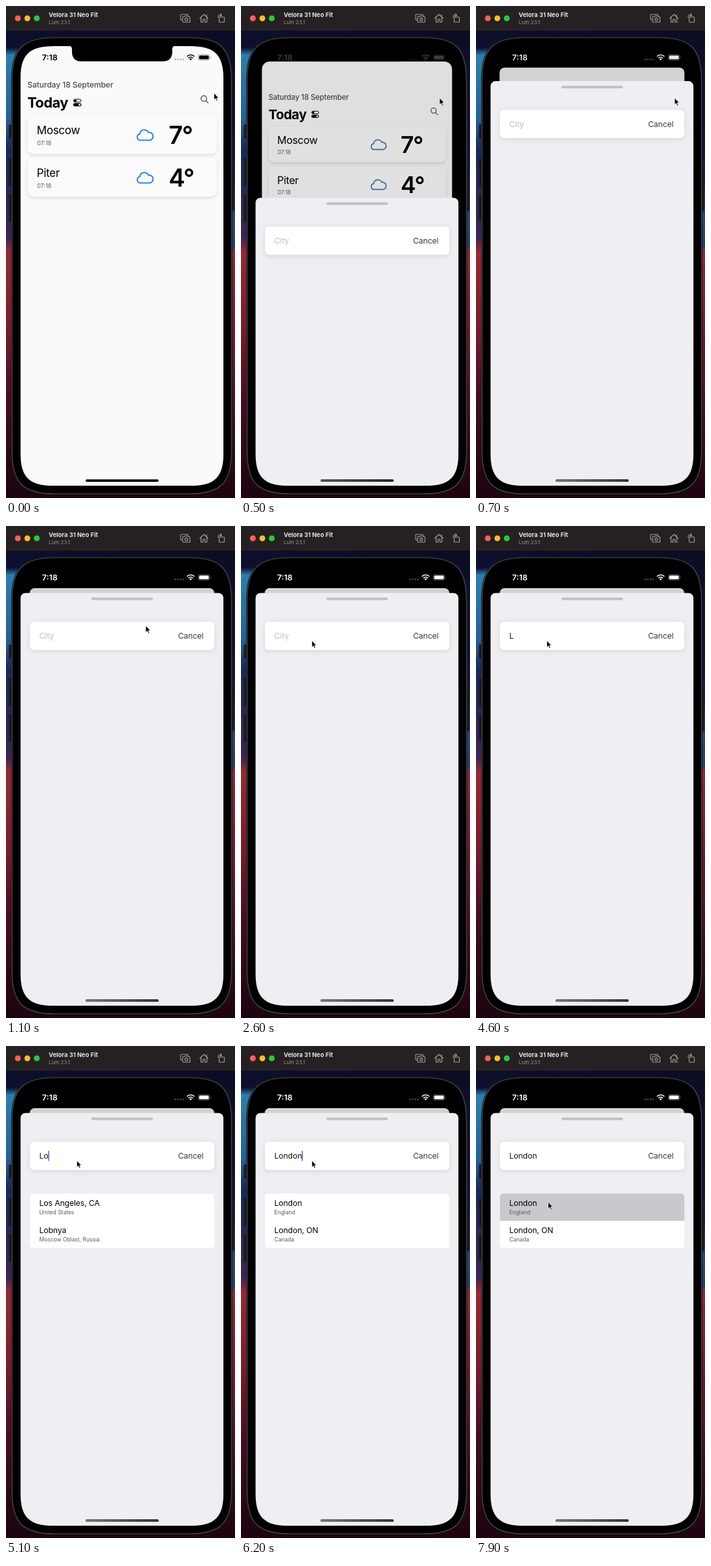
Animation of 354x760 px, one loop 8000 ms. Source, as an HTML page:

```html
<!DOCTYPE html>
<html lang="en">
<head>
<meta charset="utf-8">
<title>City search</title>
<style>
  html, body { margin: 0; width: 100%; height: 100%; overflow: hidden; background: #000; }
  svg { display: block; width: 100vw; height: 100vh; font-family: Inter, "Open Sans", sans-serif; }
  .line { fill: none; stroke-linecap: round; stroke-linejoin: round; }
  .card { fill: #fbfbfb; filter: drop-shadow(0 2.5px 2.5px rgba(0, 0, 0, .13)); }
  .field { fill: #fff; filter: drop-shadow(0 2px 4px rgba(0, 0, 0, .1)); }
  .body { font-size: 12.2px; letter-spacing: -.1px; }
  .small { font-size: 8.5px; fill: #5c5c5e; }
  .city { font-size: 17.2px; letter-spacing: -.35px; }
  .temp { font-size: 38px; font-weight: 600; letter-spacing: -1.4px; }
</style>
</head>
<body>
<svg viewBox="0 0 354 760" preserveAspectRatio="none">
  <defs>
    <linearGradient id="wallL" x2="0" y2="1">
      <stop offset="0" stop-color="#0a0b20"/>
      <stop offset=".085" stop-color="#0d1030"/>
      <stop offset=".1" stop-color="#2b7fae"/>
      <stop offset=".23" stop-color="#22629c"/>
      <stop offset=".29" stop-color="#182a5c"/>
      <stop offset=".47" stop-color="#3a2556"/>
      <stop offset=".5" stop-color="#9c2830"/>
      <stop offset=".66" stop-color="#7c1a2a"/>
      <stop offset=".8" stop-color="#480c20"/>
      <stop offset="1" stop-color="#1c0410"/>
    </linearGradient>
    <linearGradient id="wallR" x2="0" y2="1">
      <stop offset="0" stop-color="#0a0b20"/>
      <stop offset=".3" stop-color="#12153a"/>
      <stop offset=".43" stop-color="#23487e"/>
      <stop offset=".49" stop-color="#2a3a70"/>
      <stop offset=".5" stop-color="#94262f"/>
      <stop offset=".72" stop-color="#661424"/>
      <stop offset="1" stop-color="#1c0410"/>
    </linearGradient>
    <linearGradient id="bar"><stop stop-color="#777"/><stop offset="1" stop-color="#333"/></linearGradient>
    <clipPath id="screen"><path id="screenShape"/></clipPath>
    <clipPath id="listBox"><rect x="37" y="228" width="285" height="84" rx="5"/></clipPath>
  </defs>

  <rect width="180" height="760" fill="url(#wallL)"/>
  <rect x="180" width="174" height="760" fill="url(#wallR)"/>

  <!-- window bar -->
  <rect width="354" height="38" fill="#252122"/>
  <circle cx="18.3" cy="19" r="4.5" fill="#fe5f57"/>
  <circle cx="33" cy="19" r="4.5" fill="#febc2e"/>
  <circle cx="47.6" cy="19" r="4.5" fill="#28c840"/>
  <text x="66" y="17.3" font-size="9.4" font-weight="700" fill="#e6e4e5">Velora 31 Neo Fit</text>
  <text x="66" y="28" font-size="8" fill="#979495">Lum 23.1</text>
  <g class="line" stroke="#a5a2a3" stroke-width="1.1">
    <path d="M272.5 21.5H271a1 1 0 0 1-1-1V14a1 1 0 0 1 1-1h9.5a1 1 0 0 1 1 1v.8"/>
    <path d="M274 16.5h2l1-1.3h3.5l1 1.3h2a1 1 0 0 1 1 1V24a1 1 0 0 1-1 1H274a1 1 0 0 1-1-1v-6.500a1 1 0 0 1 1-1z"/>
    <circle cx="278.8" cy="20.7" r="2.1"/>
    <path d="M299.5 19l6.5-6 6.5 6M301.5 17.500V25h3v-4.500h3V25h3v-7.500M310 16v-2.500"/>
    <path d="M330.5 17h6a1 1 0 0 1 1 1v6a1 1 0 0 1-1 1h-6a1 1 0 0 1-1-1v-6a1 1 0 0 1 1-1zM328 17.500V16a2 2 0 0 1 2-2h3M331.500 12l2 2-2 2"/>
  </g>

  <!-- device -->
  <g fill="#1b1b20">
    <rect x="4.5" y="183" width="4" height="22" rx="1"/>
    <rect x="4.5" y="235" width="4" height="43" rx="1"/>
    <rect x="4.5" y="291" width="4" height="42" rx="1"/>
    <rect x="349.5" y="247" width="3.5" height="70" rx="1"/>
  </g>
  <path id="shell" fill="#17171a"/>
  <path id="rim" stroke="#4a4a4d" stroke-width="1.2"/>

  <g clip-path="url(#screen)">
    <g id="home">
      <rect class="page" x="22.3" y="62" width="314" height="690" fill="#fafafa"/>
      <text x="33" y="125.5" font-size="12.2" font-weight="500" letter-spacing="-.12" fill="#4c4c4e">Saturday 18 September</text>
      <text x="33" y="157" font-size="21.8" font-weight="700" letter-spacing="-.5">Today</text>
      <rect x="104.5" y="144" width="11.5" height="4.4" rx="2.2" fill="none" stroke="#000"/>
      <circle cx="107" cy="146.2" r="2"/>
      <rect x="104" y="149.9" width="12.5" height="5.2" rx="2.6"/>
      <circle cx="113.6" cy="152.5" r="1.6" fill="#fff"/>
      <g class="line" stroke="#3a3a3c" stroke-width="1.2">
        <circle cx="305.8" cy="143" r="4.3"/><path d="M309 146.3l3.500 3.500"/>
      </g>
      <g id="cards"></g>
      <rect class="page" id="dim" x="22.3" y="62" width="314" height="690"/>
    </g>

    <g id="sheet">
      <rect x="22.3" y="103.5" width="314" height="680" rx="8" fill="#efeef3"/>
      <rect x="132" y="110.6" width="95" height="4" rx="2" fill="#c0bfc4"/>
      <rect class="field" x="37" y="148" width="285" height="43.5" rx="6"/>
      <text class="body" x="266" y="174.2" fill="#38383a">Cancel</text>
      <text class="body" id="query" x="51.5" y="174.2"></text>
      <rect id="caret" y="162" width="1.4" height="15.5" fill="#2f5bdc"/>
      <g id="list" clip-path="url(#listBox)"></g>
    </g>
    <rect x="123" y="731.3" width="113" height="3.6" rx="1.8"/>
    <rect id="homeBar" x="123" y="731.3" width="113" height="3.6" rx="1.8" fill="url(#bar)"/>
  </g>

  <path d="M97 61.500q5 0 5 5.500v4c0 9 5 14.500 14 14.500h127c9 0 14-5.500 14-14.500v-4q0-5.500 5-5.500z"/>

  <g id="status" fill="currentColor">
    <text x="55.8" y="84" font-size="12.4" font-weight="600">7:18</text>
    <path d="M260.5 82.5h15" stroke="currentColor" stroke-width="2" stroke-dasharray="2.4 1.6" opacity=".32"/>
    <g class="line" stroke="currentColor" stroke-width="1.7" style="stroke-linecap:butt">
      <path d="M279.7 78a8 8 0 0 1 11.6 0M282 80.500a5 5 0 0 1 7 0"/>
    </g>
    <path d="M285.5 84l-2-2.100a3 3 0 0 1 4 0z"/>
    <rect x="297.2" y="75.2" width="17.6" height="8.4" rx="2.5" fill="none" stroke="currentColor" stroke-width=".8" opacity=".45"/>
    <rect x="298.5" y="76.5" width="15" height="5.8" rx="1.5"/>
    <path d="M315.9 77.900q1.600 1.500 0 3z" opacity=".5"/>
  </g>

  <path id="cursor" d="M0 0V10.300L2.400 8.200 4.100 12 5.700 11.300 4.100 7.600H7.200Z" stroke="#fff" stroke-width=".7" stroke-linejoin="round"/>
</svg>

<script>
const $ = id => document.getElementById(id);
const LOOP = 8000, STEP = 100;

const mouse = [[0, 321.5, 134.5], [300, 307, 142], [750, 307, 142], [1100, 216, 154],
  [1450, 109.5, 177], [6900, 109.5, 177], [7500, 111.5, 241]];
const typing = [[0, ''], [3900, 'L'], [4700, 'Lo'], [5500, 'Lon'], [5600, 'Lond'], [5800, 'Londo'], [6000, 'London']];
const results = [
  [0, []],
  [4900, [['Los Angeles, CA', 'United States'], ['Lobnya', 'Moscow Oblast, Russia']]],
  [6100, [['London', 'England'], ['London, ON', 'Canada']]]
];
const OPEN = 359, OPEN_TIME = 500, FOCUS = 1700, PRESS = 7600;

// rectangle whose corners ease into the sides, like the device outline
function squircle(x, y, w, h, r) {
  const a = 1.33 * r, b = .338 * r, c = a - b;
  return `M${x + a} ${y}h${w - 2 * a}c${c} 0 ${a} ${b} ${a} ${a}v${h - 2 * a}c0 ${c} ${-b} ${a} ${-a} ${a}` +
    `h${2 * a - w}c${-c} 0 ${-a} ${-b} ${-a} ${-a}v${2 * a - h}c0 ${-c} ${b} ${-a} ${a} ${-a}z`;
}
$('screenShape').setAttribute('d', squircle(22.3, 62, 314, 679, 39));
$('shell').setAttribute('d', squircle(8, 47.5, 342, 707.5, 51));
$('rim').setAttribute('d', squircle(9.5, 49, 339, 704.5, 49.5));

const card = (name, temp, y) => `<g transform="translate(0 ${y})">
  <rect class="card" x="33" width="293" height="60" rx="9"/>
  <text class="city" x="47.5" y="29.5">${name}</text>
  <text class="small" x="48" y="46.5" style="font-size:9px">07:18</text>
  <path class="line" stroke="#1877f0" stroke-width="1.8" d="M207.5 38.8a4.900 4.900 0 0 1-.6-9.700a7 7 0 0 1 13.300-2.200a5.600 5.600 0 0 1 2.300 11.900z"/>
  <text class="temp" x="251.5" y="44.5">${temp}°</text></g>`;
$('cards').innerHTML = card('Moscow', 7, 168.5) + card('Piter', 4, 234.5);

const row = ([name, place], i) => `<text class="body" x="51.5" y="${247 + 42 * i}">${name}</text>
  <text class="small" x="51.5" y="${260.3 + 42 * i}">${place}</text>`;

const lists = results.map(([, rows]) => rows.length
  ? '<rect x="37" y="228" width="285" height="84" fill="#fff"/><rect class="press" x="37" y="228" width="285" height="42" fill="#c9c8cd"/>' + rows.map(row).join('')
  : '');

const clamp = v => Math.min(1, Math.max(0, v));
const lastAt = (table, t) => table.reduce((found, [at], i) => at <= t ? i : found, 0);

function track(points, t) {
  const i = lastAt(points, t), a = points[i], b = points[i + 1] || a;
  const k = b === a ? 0 : (t - a[0]) / (b[0] - a[0]);
  return [a[1] + (b[1] - a[1]) * k, a[2] + (b[2] - a[2]) * k];
}

// cubic-bezier(.38, .7, .125, 1), solved by bisection
function spring(x) {
  const curve = (s, p, q) => 3 * (1 - s) ** 2 * s * p + 3 * (1 - s) * s * s * q + s ** 3;
  let lo = 0, hi = 1;
  for (let i = 0; i < 24; i++) {
    const mid = (lo + hi) / 2;
    if (curve(mid, .38, .125) < x) lo = mid; else hi = mid;
  }
  return x <= 0 ? 0 : x >= 1 ? 1 : curve(lo, .7, 1);
}

let shownList = -1;

function draw(t) {
  const p = spring(clamp((t - OPEN) / OPEN_TIME));
  const scale = 1 - .092 * p;
  $('home').setAttribute('transform', `translate(${179.3 * (1 - scale)} ${62 * (1 - scale) + 34 * p}) scale(${scale})`);
  document.querySelectorAll('.page').forEach(page => page.setAttribute('rx', 8 + 16 * (1 - p)));
  $('cards').style.filter = p ? `saturate(${1 - .7 * p})` : 'none';
  $('dim').setAttribute('opacity', .16 * p);
  $('sheet').setAttribute('transform', `translate(0 ${637.5 * (1 - p)})`);
  $('homeBar').setAttribute('opacity', p);
  const tone = Math.round(255 * p ** 4);
  $('status').style.color = `rgb(${tone},${tone},${tone})`;

  const [since, text] = typing[lastAt(typing, t)];
  const query = $('query');
  query.textContent = text || 'City';
  query.setAttribute('fill', text ? '#111' : '#bdbdc0');
  $('caret').setAttribute('x', 51.2 + (text ? query.getComputedTextLength() : 0));
  const blink = (t - Math.max(since, FOCUS)) % 1000;
  $('caret').setAttribute('opacity', t >= FOCUS && blink < 500 ? 1 : 0);

  const n = lastAt(results, t);
  if (n !== shownList) $('list').innerHTML = lists[shownList = n];
  const press = document.querySelector('.press');
  if (press) press.setAttribute('opacity', t >= PRESS ? 1 : 0);

  $('cursor').setAttribute('transform', `translate(${track(mouse, t)})`);
}

const start = performance.now();
function tick() {
  const t = (performance.now() - start + 5) % LOOP;
  draw(Math.floor(t / STEP) * STEP);
  requestAnimationFrame(tick);
}
tick();
</script>
</body>
</html>
```
